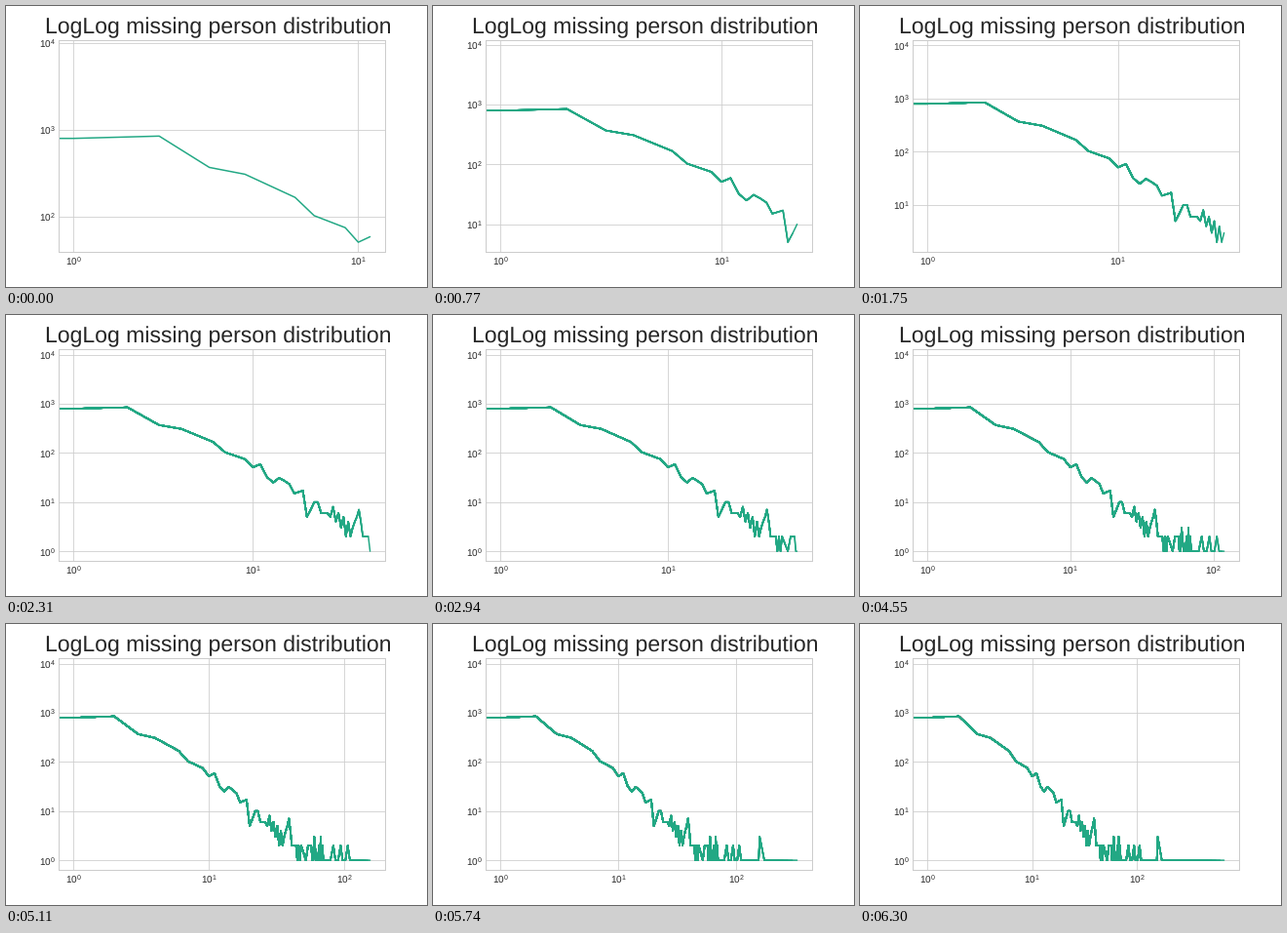
These frames come from a looping animation (432 by 288 pixels, 7.07 s). A matplotlib script:

```python
import numpy as np
import matplotlib.pyplot as plt
from matplotlib.animation import FuncAnimation
from matplotlib.ticker import NullFormatter

W, H, DPI = 432, 288, 72
STEP_MS, FRAMES = 70, 101
FIRST = 12            # points on show at the start
GREEN, INK, GRID = "#22a884", "0.15", "0.8"

plt.rcParams.update({
    "font.family": "Liberation Sans",
    "font.size": 10,
    "text.hinting": "none",
    "text.color": INK,
    "axes.edgecolor": GRID,
    "axes.linewidth": 1,
    "axes.axisbelow": True,
    "grid.color": GRID,
    "grid.linewidth": 0.8,
    "lines.linewidth": 1.5,
    "lines.solid_capstyle": "round",
})

# Bends of the falling curve: (size, count)
BENDS = [(1, 795), (2, 845), (3, 369), (4, 308), (6, 167), (7, 103), (9, 75),
         (10, 51), (11, 59), (12, 32), (13, 25), (14, 31), (16, 23), (17, 15),
         (19, 17), (20, 5), (22, 10), (23, 10), (24, 6), (28, 6.5), (33, 3.2),
         (36, 3), (39, 7), (41, 2), (44, 2)]


def make_sizes():
    """Every size at first, then ever wider gaps."""
    return np.round(np.r_[0:42, 43:49, 52:57:2, 57:61, 62:70,
                          np.geomspace(70, 115, 13),
                          np.geomspace(115, 155, 10)[1:],
                          np.geomspace(158, 680, 17)])


def make_counts(sizes):
    """Straight log-log stretches, a zigzag, then a floor of ones."""
    counts = np.ones(len(sizes))
    bend_x, bend_y = np.log(BENDS).T
    body = sizes[1:44]
    trend = np.exp(np.interp(np.log(body), bend_x, bend_y))
    zigzag = np.where((body > 26) & (body < 36), 1.3 ** (-1) ** body, 1)
    counts[1:44] = np.round(trend * zigzag)
    counts[0] = 8380
    # Runs of twos spread out towards the tail, with three higher spikes
    for run in (slice(45, 48, 2), slice(49, 52), slice(58, 63, 2),
                slice(67, 76, 3)):
        counts[run] = 2
    counts[[47, 54, 60, 85]] = 2, 3, 3, 3
    return counts


def padded(low, high, margin=0.05):
    """Log-scale limits with a margin on both sides."""
    a, b = np.log10([low, high])
    pad = margin * (b - a)
    return 10 ** (a - pad), 10 ** (b + pad)


sizes = make_sizes()
counts = make_counts(sizes)

fig = plt.figure(figsize=(W / DPI, H / DPI), dpi=DPI, facecolor="white")
ax = fig.add_axes([0.125, 0.125, 0.775, 0.755])
ax.set_xscale("log", nonpositive="clip")
ax.set_yscale("log", nonpositive="clip")
ax.grid(True, which="major")
ax.tick_params(which="both", length=0, pad=3.5, labelcolor=INK)
for axis in (ax.xaxis, ax.yaxis):
    axis.set_minor_formatter(NullFormatter())
ax.set_title("LogLog missing person distribution", fontsize=23, x=0.49)

# Every step lays a longer curve over the earlier ones
curves = [ax.plot(sizes[:n], counts[:n], color=GREEN, visible=False)[0]
          for n in range(FIRST, len(sizes) + 1)]


def update(frame):
    last = min(frame, len(curves) - 1)
    for i, curve in enumerate(curves):
        curve.set_visible(i <= last)
    n = FIRST + last
    ax.set_xlim(padded(1, sizes[n - 1]))
    ax.set_ylim(padded(counts[:n].min(), counts[0]))
    return curves


anim = FuncAnimation(fig, update, frames=FRAMES, interval=STEP_MS,
                     repeat=True, repeat_delay=0, blit=False)
plt.show()
```
